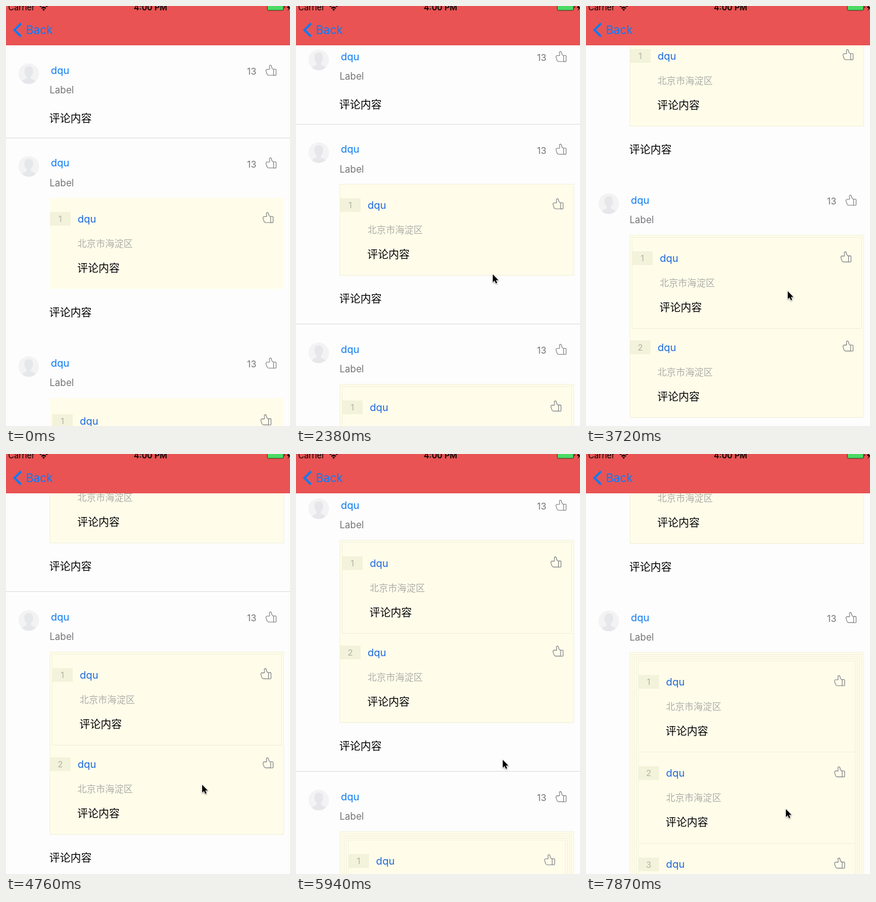
An HTML page for the animation above (8000 ms loop, 456 px wide and 673 px high).

```html
<!DOCTYPE html>
<html lang="zh">
<head>
<meta charset="utf-8">
<style>
html, body { margin: 0; width: 100%; height: 100%; overflow: hidden; background: #fdfdfd; }
svg { display: block; width: 456px; height: 673px; font-family: Inter, "Noto Sans CJK SC", "Noto Sans CJK", sans-serif; }
.name { font-size: 16.4px; fill: #0a7bf5; }
.reply { font-size: 16.4px; fill: #1966dc; }
.label { font-size: 15.2px; fill: #757579; }
.count { font-size: 14.6px; fill: #757579; }
.body { font-size: 17px; fill: #000; }
.place { font-size: 14.8px; fill: #adada8; }
.badge { font-size: 13.5px; fill: #b2b2a6; text-anchor: middle; }
.box { fill: #fffdea; stroke: #f2f1dc; }
.top .box { stroke: none; }
.sep { fill: #dedee0; }
.lost .thin { opacity: 0; }
</style>
</head>
<body>
<svg viewBox="0 0 456 673">
  <defs>
    <g id="thumb" fill="none" stroke="#85858a" stroke-width="1.1" stroke-linejoin="round">
      <path d="M13 17H5Q3 17 2.4 15L.8 10.2Q.4 7.8 2.8 7.5H6.4Q7 5 6.2 2.6Q6.2.8 7.8.8Q9.6 1 9.8 3.8Q10 6.4 13 7.8"/>
      <path d="M13 7.3h3q1 0 1 1v7.8q0 1-1 1h-3z"/>
    </g>
    <g id="avatar">
      <circle r="16.5" fill="#f3f3f4"/>
      <path d="M-11 12.3Q-9 9.5-3.5 8V4.5Q-7 1-7-4Q-7-12 0-12T7-4Q7 1 3.5 4.5V8Q9 9.5 11 12.3A16.5 16.5 0 0 1-11 12.3Z" fill="#e6e7ea"/>
    </g>
  </defs>
  <g id="list"></g>
  <g id="bar">
    <rect width="456" height="63" fill="#e95353"/>
    <text x="3.5" y="7.3" font-size="13">Carrier</text>
    <text x="232" y="7.4" font-size="13" font-weight="600" text-anchor="middle">4:00 PM</text>
    <path d="M54.5 1Q60.5-4 66.5 1M57 3.8Q60.5.9 64 3.8" fill="none" stroke="#000" stroke-width="2"/>
    <path d="M58.5 5.5Q60.5 4 62.5 5.5L60.5 7.8Z"/>
    <rect x="419.5" y="-4" width="26" height="11" rx="2" fill="#4cd964" stroke="#222" stroke-width=".8"/>
    <path d="M447 0q2 1.5 0 4zM455-3l-4 6h3l-2 5 5-6h-3z"/>
    <path d="M24 28L13.5 38.4 24 48.8" fill="none" stroke="#0a7cfb" stroke-width="3.4"/>
    <text x="32" y="45.2" font-size="18.5" fill="#0a7cfb">Back</text>
  </g>
  <path id="cursor" d="M0 0V12.5L2.9 9.9 5 14.6 7 13.8 5 9.2H9Z" stroke="#fff" stroke-width="1.2"
    paint-order="stroke" style="filter: drop-shadow(0 1px 1px #0006)"/>
</svg>
<script>
const list = document.getElementById('list'), cursor = document.getElementById('cursor');
const USER = 'dqu', COMMENT = '评论内容', INSET = 3.4, REPLY_STEP = 146.2, MAX_DEPTH = 4;

const text = (cls, x, y, str) => `<text class="${cls}" x="${x}" y="${y}">${str}</text>`;
const use = (id, x, y) => `<use href="#${id}" x="${x}" y="${y}"/>`;
const box = (d, top, bottom) =>
  `<rect class="box" x="${70.6 + d}" y="${top}" width="${375.3 - 2 * d}" height="${bottom - top}"/>`;

const reply = (n, d, y) =>
  `<path class="box" d="M${71 + d} ${y + 112.5}H${445 - d}"/>`
  + `<rect x="${70.7 + d}" y="${y - 11}" width="33" height="22" fill="#f3f2da"/>`
  + text('badge', 87 + d, y + 5, n)
  + text('reply', 115 + d, y + 5.7, USER)
  + text('place', 114.8 + d, y + 44.6, '北京市海淀区')
  + text('body', 114.5 + d, y + 85, COMMENT)
  + use('thumb', 411.9 - d, y - 11);

// Earlier replies sit deeper; each depth has its own box down to its last reply.
function thread(top, count) {
  const depth = i => Math.min(MAX_DEPTH, count - i) * INSET;
  const replyY = i => top + 33.5 + depth(i) + (i - 1) * REPLY_STEP;
  let boxes = '', replies = '';
  for (let i = 1; i <= count; i++) {
    replies += reply(i, depth(i), replyY(i));
    if (i < count - MAX_DEPTH) continue;
    boxes = box(depth(i), top + depth(i), replyY(i) + 112.5) + boxes;
  }
  return { html: boxes + replies, bottom: replyY(count) + 112.5 };
}

let y = 103;
for (const count of [0, 1, 2, 7]) {
  const { html, bottom } = count ? thread(y + 56, count) : { html: '', bottom: y + 39.3 };
  const bodyY = bottom + 37.7, sepY = bodyY + (count ? 40.5 : 31);
  list.innerHTML += use('avatar', 36.5, y + 5.5)
    + text('name', 72, y + 5.5, USER)
    + text('label', 70, y + 37, 'Label')
    + text('count', 387, y + 7, '13')
    + use('thumb', 416.7, y - 9)
    + html
    + text('body', 69.5, bodyY + 6, COMMENT)
    + `<rect class="sep ${count ? 'thin' : ''}" y="${Math.floor(sepY)}" width="456" height="1"/>`;
  y = sepY + 40.5;
}

// Pointer gestures in ticks: the first only enters, the last only marks where the pointer comes to rest.
const drags = [
  { start: 0, ticks: 3, from: [404, 437], to: [318, 452], coast: 0 },
  { start: 6, ticks: 4.1, from: [318, 452], to: [302, 307], coast: 0 },
  { start: 14, ticks: 2.95, from: [332, 573], to: [321, 419], coast: 0 },
  { start: 22, ticks: 5.5, from: [315, 542], to: [318, 404], coast: 31 },
  { start: 30, ticks: 3, from: [336, 512], to: [319, 429], coast: 7 },
  { start: 37, ticks: 2.85, from: [332, 585], to: [318, 404], coast: 38 },
  { start: 45, ticks: 1, from: [321, 569], to: [321, 569], coast: 0 }
];
const RETURN = 1.4, COAST = 1.2;

const clamp = v => Math.min(1, Math.max(0, v));
const smooth = v => (v = clamp(v), v * v * (3 - 2 * v));
const easeOut = v => 1 - (1 - clamp(v)) ** 2;
const mix = (a, b, p) => a.map((v, i) => v + (b[i] - v) * p);

function pose(tick) {
  let scroll = 0, point = drags[0].from;
  for (const { start, ticks, from, to, coast } of drags) {
    point = mix(point, from, smooth((tick - start + 1 + RETURN) / RETURN));
    const age = tick - start;
    if (age < 0) break;
    point = mix(from, to, smooth(age / ticks));
    scroll += Math.max(0, from[1] - point[1]) + coast * easeOut((age - ticks) / COAST);
  }
  return [scroll, ...point].map(Math.round);
}

function draw(now) {
  const tick = Math.floor((now % 8000 - 1335) / 148.1);
  const [scroll, x, y] = pose(tick);
  list.setAttribute('transform', `translate(0 ${-scroll})`);
  cursor.setAttribute('transform', `translate(${x} ${y})`);
  cursor.setAttribute('visibility', tick < 0 ? 'hidden' : 'visible');
  list.classList.toggle('top', scroll === 0);
  // Hairlines periodically fall between pixel rows.
  list.classList.toggle('lost', scroll % 9 < 4);
  requestAnimationFrame(draw);
}
draw(performance.now());
</script>
</body>
</html>
```
